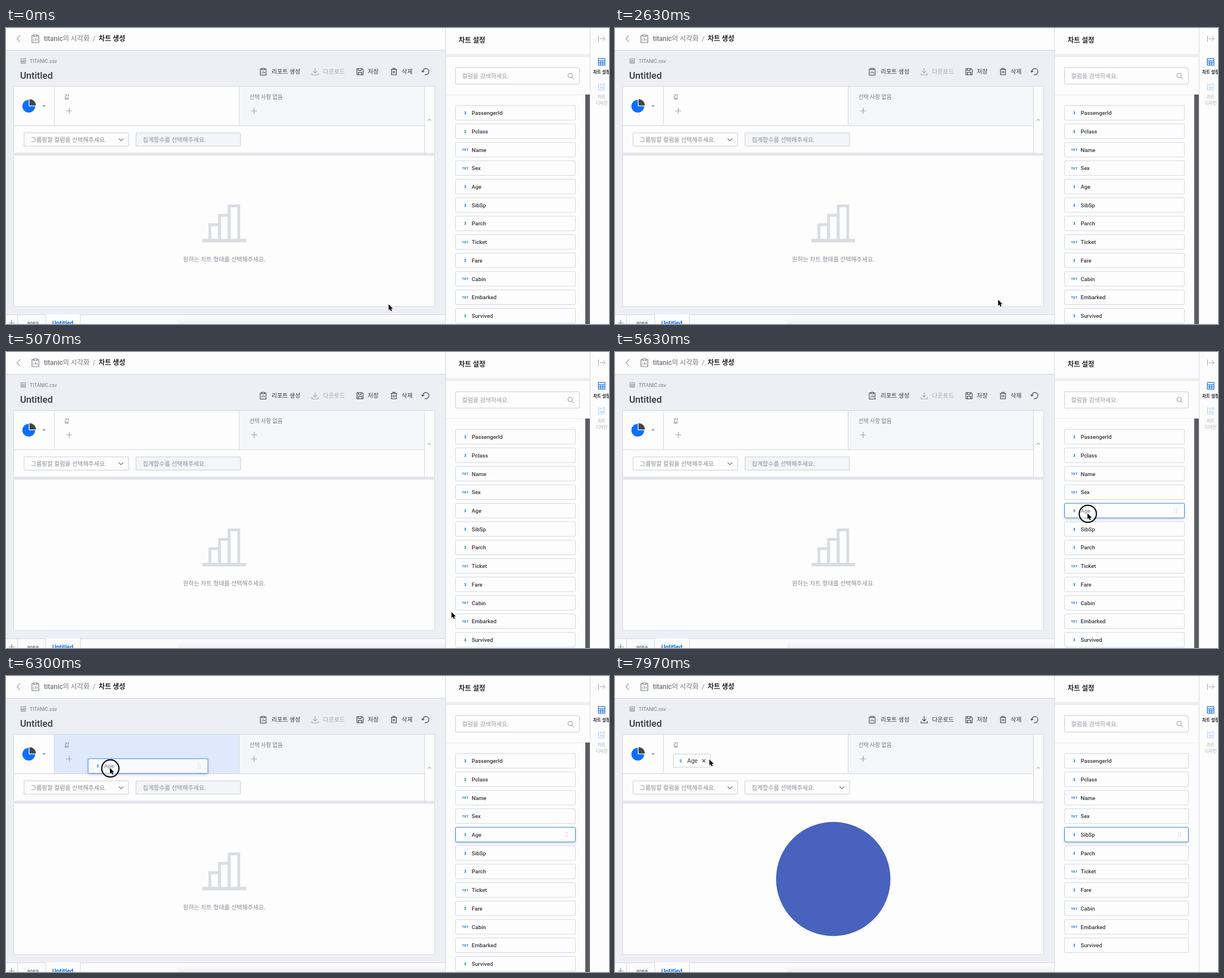
These frames come from a looping animation (1067 by 525 pixels, 8 s). An HTML page with a canvas:

```html
<!DOCTYPE html>
<html lang="ko">
<head>
<meta charset="utf-8">
<title>Chart builder</title>
<style>
html, body { margin: 0; width: 100%; height: 100%; overflow: hidden; background: #fff; }
canvas { display: block; width: 1067px; height: 525px; }
</style>
</head>
<body>
<canvas id="stage"></canvas>
<script>
const W = 1067, H = 525, LOOP = 8000;
const PRESS = 5480, DRAG = 5680, DROP = 7250, CHART = 7500;
const FONT = 'Roboto, "Noto Sans CJK KR", "Noto Sans CJK", "Noto Sans KR", sans-serif';
const BLUE = '#1a6fd6', DARK = '#36383d', GREY = '#8a8d94', LINE = '#d3d7dd', WHITE = '#fdfdfe';

const canvas = document.getElementById('stage');
const scale = window.devicePixelRatio || 1;
canvas.width = W * scale;
canvas.height = H * scale;
const ctx = canvas.getContext('2d');
ctx.scale(scale, scale);

function rect(x, y, w, h, color) {
  ctx.fillStyle = color;
  ctx.fillRect(x, y, w, h);
}

function box(x, y, w, h, fill, border, r = 0) {
  ctx.beginPath();
  ctx.roundRect(x, y, w, h, r);
  ctx.fillStyle = fill;
  ctx.fill();
  ctx.shadowColor = 'transparent';
  ctx.strokeStyle = border;
  ctx.lineWidth = 1;
  ctx.stroke();
}

function path(d, color, width = 1) {
  ctx.strokeStyle = color;
  ctx.lineWidth = width;
  ctx.stroke(new Path2D(d));
}

function shape(d, color) {
  ctx.fillStyle = color;
  ctx.fill(new Path2D(d));
}

function disc(x, y, r, color) {
  ctx.beginPath();
  ctx.arc(x, y, r, 0, 7);
  ctx.fillStyle = color;
  ctx.fill();
}

// y is the vertical middle of the text
function text(str, x, y, size, color, weight = 400, align = 'left') {
  ctx.font = `${weight} ${size}px ${FONT}`;
  ctx.textAlign = align;
  ctx.fillStyle = color;
  ctx.fillText(str, x, y + size * 0.36);
}

function at(x, y, draw) {
  ctx.save();
  ctx.translate(x, y);
  draw();
  ctx.restore();
}

// Pointer stops: time, x, y, eased arrival
const stops = [
  [0, 677, 490], [2540, 677, 490], [2630, 678, 482], [4430, 787, 466, 1],
  [5030, 787, 466], [5450, 836, 286, 1], [DRAG, 836, 286], [5830, 690, 232],
  [6200, 200, 188], [6300, 184, 163], [6650, 167, 148, 1], [LOOP, 167, 148]
];

function pointer(t) {
  const i = Math.max(1, stops.findIndex(s => s[0] >= t));
  const [t0, x0, y0] = stops[i - 1], [t1, x1, y1, eased] = stops[i];
  let k = (t - t0) / (t1 - t0);
  if (eased) k = i === 10 ? 1 - (1 - k) ** 2 : k * k * (3 - 2 * k);
  return [x0 + (x1 - x0) * k, y0 + (y1 - y0) * k];
}

function plus(x, y, r, color) {
  path(`M${x - r} ${y}H${x + r}M${x} ${y - r}V${y + r}`, color, 1.2);
}

function clipboard(x, y, k, color) {
  at(x, y, () => {
    ctx.scale(k, k);
    path('M-3 -5.5H-6V7H6V-5.5H3M-3 -7H3V-4H-3ZM-3 3.5V1.5M0 3.5V-1M3 3.5V0.5', color, 1.2);
  });
}

function table(x, y, r, color) {
  at(x, y, () => path(
    `M${-r} ${-r}H${r}V${r}H${-r}ZM${-r} ${-r / 3}H${r}M${-r} ${r / 3}H${r}M${-r / 3} ${-r / 3}V${r}M${r / 3} ${-r / 3}V${r}`,
    color, r > 5 ? 1.2 : 0.9));
}

function typeMark(kind, x, y) {
  text(kind, x, y, kind === '3' ? 7 : 6, BLUE, 700, 'center');
}

const columns = 'PassengerId Pclass Name Sex Age SibSp Parch Ticket Fare Cabin Embarked Survived'.split(' ');
const textual = ['Name', 'Sex', 'Ticket', 'Cabin', 'Embarked'];

function item(name, x, y, w, active) {
  ctx.save();
  if (active) {
    ctx.shadowColor = 'rgba(50,70,100,.28)';
    ctx.shadowBlur = 5 * scale;
    ctx.shadowOffsetY = 2 * scale;
  }
  box(x, y, w, 26, WHITE, active ? '#3e86d8' : LINE, 1.5);
  ctx.restore();
  typeMark(textual.includes(name) ? 'TXT' : '3', x + 17, y + 13.2);
  text(name, x + 28.5, y + 13.2, 9.75, DARK, 500);
  if (active) {
    for (let i = 0; i < 6; i++) rect(x + w - 18 + (i % 2) * 3.5, y + 9 + (i >> 1) * 3.5, 1.4, 1.4, '#c3c7cd');
  }
}

function header() {
  rect(0, 0, 777, 40, WHITE);
  rect(0, 39, 777, 1, '#d0d3db');
  path('M25 13L19.5 19L25 25', GREY, 1.1);
  clipboard(52, 19, 1, '#777a81');
  text('titanic의 시각화', 67, 19, 12, '#74777e', 500);
  text('/', 153.5, 19, 12, GREY);
  text('차트 생성', 164, 19, 12, '#25272b', 700);
}

function toolbar(ready) {
  table(30.5, 58.5, 4.2, GREY);
  text('TITANIC.csv', 42, 58.7, 8.8, '#777a81');
  text('Untitled', 25, 84, 16.6, DARK, 500);

  clipboard(455, 77.5, 0.85, DARK);
  text('리포트 생성', 470, 77, 10.5, DARK, 500);
  const tone = ready ? DARK : '#a5a8af';
  path('M547 71V80M543.5 76.5L547 80L550.5 76.5M541.5 80V83.2H552.5V80', tone, 1.1);
  text('다운로드', 561, 77, 10.5, tone, 500);
  path('M621 72H630L632 74V83H621ZM623.5 72V75.5H628.5V72M623.5 83V78.5H629.5V83', DARK, 1.1);
  text('저장', 640, 77, 10.5, DARK, 500);
  path('M681 73.5H692M684.5 73.5V71.5H688.5V73.5M682.2 73.5V83H690.8V73.5M685.2 76V80.5M687.8 76V80.5', DARK, 1.1);
  text('삭제', 700, 77, 10.5, DARK, 500);
  path('M737.5 78A5.5 5.5 0 1 1 741 82.5M735.3 75.5L737.5 78.2L740.2 76', DARK, 1.1);
}

function select(label, x, open) {
  box(x, 186, 185, 23.5, open ? WHITE : '#f4f5f8', '#c9cdd4', 1);
  text(label, x + 12, 197.8, 10.5, GREY);
  if (open) path(`M${x + 167.5} 196L${x + 171.5} 200L${x + 175.5} 196`, '#6f737a', 1.1);
}

function settings(over, dropped) {
  box(13.5, 103.5, 745, 118.5, WHITE, LINE);
  rect(412, 104, 328, 69.5, '#f5f6f9');
  if (over) rect(86, 104, 326, 69.5, '#deeafc');
  path('M85.5 104V173M412.5 104V173M740.5 104V222M14 173.5H740', LINE);

  disc(40.3, 138.8, 11.3, '#0d6efd');
  shape('M40.3 138.8V126H53V138.8Z', WHITE);
  shape('M41.6 137.6V126.2A11.3 11.3 0 0 1 52.9 137.6Z', '#414449');
  shape('M64.3 137H70.3L67.3 140.2Z', '#8f939a');

  text('값', 103, 122, 9.75, '#777a81');
  text('선택 사항 없음', 430.7, 122, 9.75, '#777a81');
  plus(439, 147, 5.2, '#9b9fa6');
  if (dropped) {
    box(103.5, 138.5, 65, 23.5, WHITE, '#c9cdd4', 1);
    typeMark('3', 116, 150.5);
    text('Age', 127.8, 150.5, 10.5, DARK, 400);
    path('M154.5 147.7L160 153.2M160 147.7L154.5 153.2', DARK, 1.1);
  } else {
    plus(112, 147, 5.2, '#9b9fa6');
  }
  path('M746 164.5L749 161.5L752 164.5', '#777a81', 1);
  select('그룹핑할 컬럼을 선택해주세요.', 32, true);
  select('집계함수를 선택해주세요.', 230, dropped);
}

function chart(ready) {
  rect(14, 222.5, 745, 3, '#e4e6eb');
  box(13.5, 225.5, 745, 268.5, WHITE, LINE);
  if (ready) {
    disc(386.2, 360, 101.2, '#4862be');
    return;
  }
  for (let i = 0; i < 3; i++) {
    path(`M${360.8 + i * 17} 377V${348.8 - i * 16.6}h17V377`, '#d9dde2', 5);
  }
  rect(347.5, 374, 77.5, 6.2, '#d9dde2');
  text('원하는 차트 형태를 선택해주세요.', 386.2, 410.5, 10.5, GREY, 400, 'center');
}

function tabs() {
  rect(0, 508, 777, 17, '#fbfbfc');
  rect(0, 508, 777, 1, LINE);
  rect(71, 508, 60, 17, WHITE);
  path('M20.5 508V525M70.5 508V525M131.5 508V525', LINE);
  plus(10, 523, 5, GREY);
  text('area', 37.3, 523, 10.5, '#74777e', 500);
  text('Untitled', 82, 523, 10.5, '#1273e6', 700);
  const g = ctx.createLinearGradient(0, 514, 0, 525);
  g.addColorStop(0, 'rgba(238,238,241,0)');
  g.addColorStop(1, 'rgba(238,238,241,.9)');
  rect(305, 514, 472, 11, g);
}

function panel(hover, dropped) {
  rect(777, 0, 290, H, WHITE);
  rect(777, 0, 1, H, LINE);
  text('차트 설정', 801, 22, 12, '#25272b', 700);
  rect(778, 46, 255, 6, '#eeeff3');
  box(795.5, 70.5, 219, 29, WHITE, '#c9cdd4', 1.5);
  text('컬럼을 검색하세요.', 807, 85, 10.5, '#9a9da4');
  path('M1002.2 84.2A3.9 3.9 0 1 1 994.4 84.2A3.9 3.9 0 1 1 1002.2 84.2M1001.2 87L1004.5 90.3', GREY, 1);
  rect(778, 118, 255, 1, '#e6e8ec');

  const list = dropped ? columns.filter(c => c !== 'Age') : columns;
  list.forEach((name, i) => {
    item(name, 795.5, 137.4 + i * 32.72, dropped ? 219 : 212, i === hover);
  });
  if (!dropped) rect(1025, 118, 8, 407, '#5b5c5f');
  rect(1033, 0, 1, H, LINE);

  path('M1048.5 13.5V24.5M1051 19H1060M1056.5 15.3L1060.2 19L1056.5 22.7', '#9da1a8', 1);
  table(1054, 60, 5.8, BLUE);
  text('차트 설정', 1039, 78, 7.5, '#25272b', 700);
  path('M1048.5 98V110H1060', '#a9c8ee', 1);
  for (const [x, y, r] of [[1052.5, 100.5, 1.5], [1058, 100, 1.8], [1053, 106, 1.3], [1057.5, 106, 1.8]]) {
    ctx.beginPath();
    ctx.arc(x, y, r, 0, 7);
    ctx.stroke();
  }
  text('차트', 1054, 122, 7.5, '#a5a8af', 400, 'center');
  text('디자인', 1054, 133, 7.5, '#a5a8af', 400, 'center');
}

function cursor(x, y, pressed) {
  if (pressed) {
    disc(x + 0.7, y + 1, 16.5, 'rgba(255,255,255,.4)');
    ctx.beginPath();
    ctx.arc(x + 0.7, y + 1, 15.2, 0, 7);
    ctx.strokeStyle = '#0b0b0d';
    ctx.lineWidth = 2.2;
    ctx.stroke();
  }
  at(x, y, () => {
    const arrow = 'M0 0V10.6L2.4 8.4L4 12.2L5.9 11.4L4.3 7.7H7.6Z';
    path(arrow, '#fff', 1.6);
    shape(arrow, '#000');
  });
}

function hoverRow(t, x, y) {
  if (t >= PRESS) return 4;
  const row = Math.floor((y - 137) / 32.72);
  const inside = x > 795 && x < 1008 && y - 137 - row * 32.72 < 27;
  return inside ? row : -1;
}

function draw(t) {
  const [x, y] = pointer(t);
  const dragging = t >= DRAG && t < DROP;
  const dropped = t >= DROP, ready = t >= CHART;

  rect(0, 0, W, H, '#eeeff4');
  header();
  toolbar(ready);
  settings(dragging && x > 86 && x < 412 && y < 173.5, dropped);
  chart(ready);
  tabs();
  panel(hoverRow(t, x, y), dropped);
  if (dragging) {
    const [gx, gy] = pointer(Math.max(DRAG, t - 12));
    ctx.globalAlpha = 0.94;
    item('Age', gx - 40.5, gy - 19, 212, true);
    ctx.globalAlpha = 1;
  }
  cursor(x, y, t >= PRESS && t < DROP);
}

const start = performance.now();
function frame() {
  draw((performance.now() - start) % LOOP);
  requestAnimationFrame(frame);
}
frame();
</script>
</body>
</html>
```
